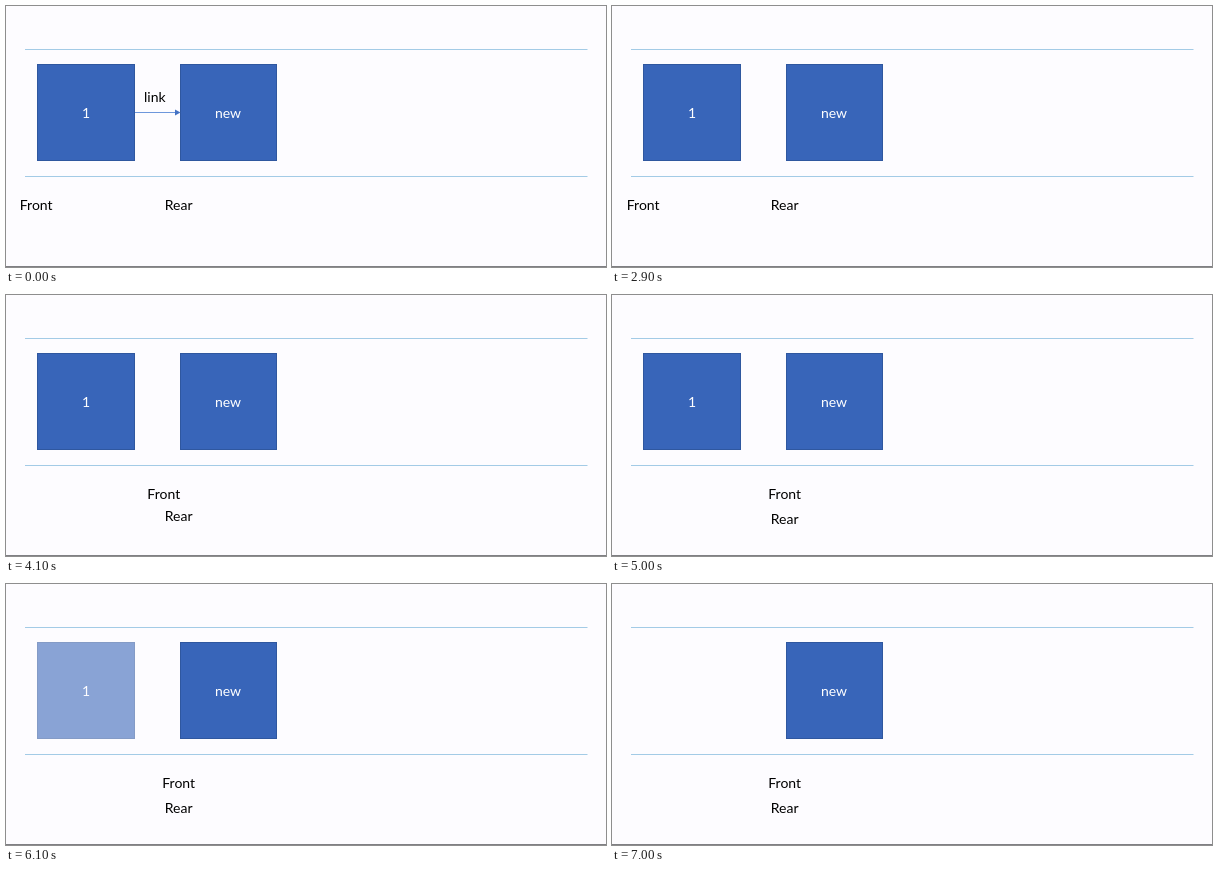
Recreate the animation shown at these times as an HTML page. Size 600x261 px, loop 8100 ms.

```html
<!DOCTYPE html>
<html lang="en">
<head>
<meta charset="utf-8">
<title>Dequeue</title>
<style>
  html, body { margin: 0; width: 100%; height: 100%; overflow: hidden; background: #fdfcff; }
  svg { display: block; width: 600px; height: 261px; }
  text { font: 14px Lato, Carlito, sans-serif; }
  .rule { stroke: #a3cbe6; }
  .box rect { fill: #3865b9; stroke: #2f579f; }
  .box text { fill: #fff; text-anchor: middle; }
</style>
</head>
<body>
<svg viewBox="0 0 600 261">
  <path class="rule" d="M19 43.5H581.5M19 170.5H581.5"/>
  <path d="M0 260.5H600" stroke="#808084"/>

  <g class="box" id="first">
    <rect x="31.5" y="58.5" width="97" height="96"/>
    <text x="80" y="112">1</text>
  </g>
  <g class="box">
    <rect x="174.5" y="58.5" width="96" height="96"/>
    <text x="222" y="112">new</text>
  </g>

  <g id="link">
    <text x="138" y="95.5">link</text>
    <path d="M129 106.5H170" stroke="#6d97dc"/>
    <path d="M169 103.5L174.5 106.5L169 109.5Z" fill="#4472c4"/>
  </g>

  <text id="front" x="13.8" y="204">Front</text>
  <text id="rear" x="158.8" y="204">Rear</text>
</svg>
<script>
  const LOOP = 8100, TICK = 100;
  const part = id => document.getElementById(id);
  const link = part('link'), first = part('first'), front = part('front'), rear = part('rear');

  const progress = (t, start, length) => Math.min(1, Math.max(0, (t - start) / length));
  const fade = (t, start, length) => 1 - progress(t, start, length) ** 1.5;

  // Cubic Bezier (.25, .1, .25, 1), solved for x by bisection
  function ease(x) {
    if (x <= 0 || x >= 1) return x;
    const curve = (a, b, s) => 3 * a * s * (1 - s) ** 2 + 3 * b * s * s * (1 - s) + s ** 3;
    let low = 0, high = 1;
    for (let i = 0; i < 24; i++) {
      const mid = (low + high) / 2;
      if (curve(.25, .25, mid) < x) low = mid; else high = mid;
    }
    return curve(.1, 1, low);
  }

  function draw(t) {
    const move = ease(progress(t, 2870, 2000));
    link.setAttribute('opacity', fade(t, 650, 550));
    first.setAttribute('opacity', fade(t, 5850, 450));
    front.setAttribute('transform', `translate(${142.5 * move} 0)`);
    rear.setAttribute('transform', `translate(0 ${24.7 * move})`);
  }

  const origin = performance.now();
  function frame() {
    const t = (performance.now() - origin) % LOOP;
    draw(Math.floor(t / TICK) * TICK);
    requestAnimationFrame(frame);
  }
  frame();
</script>
</body>
</html>
```
